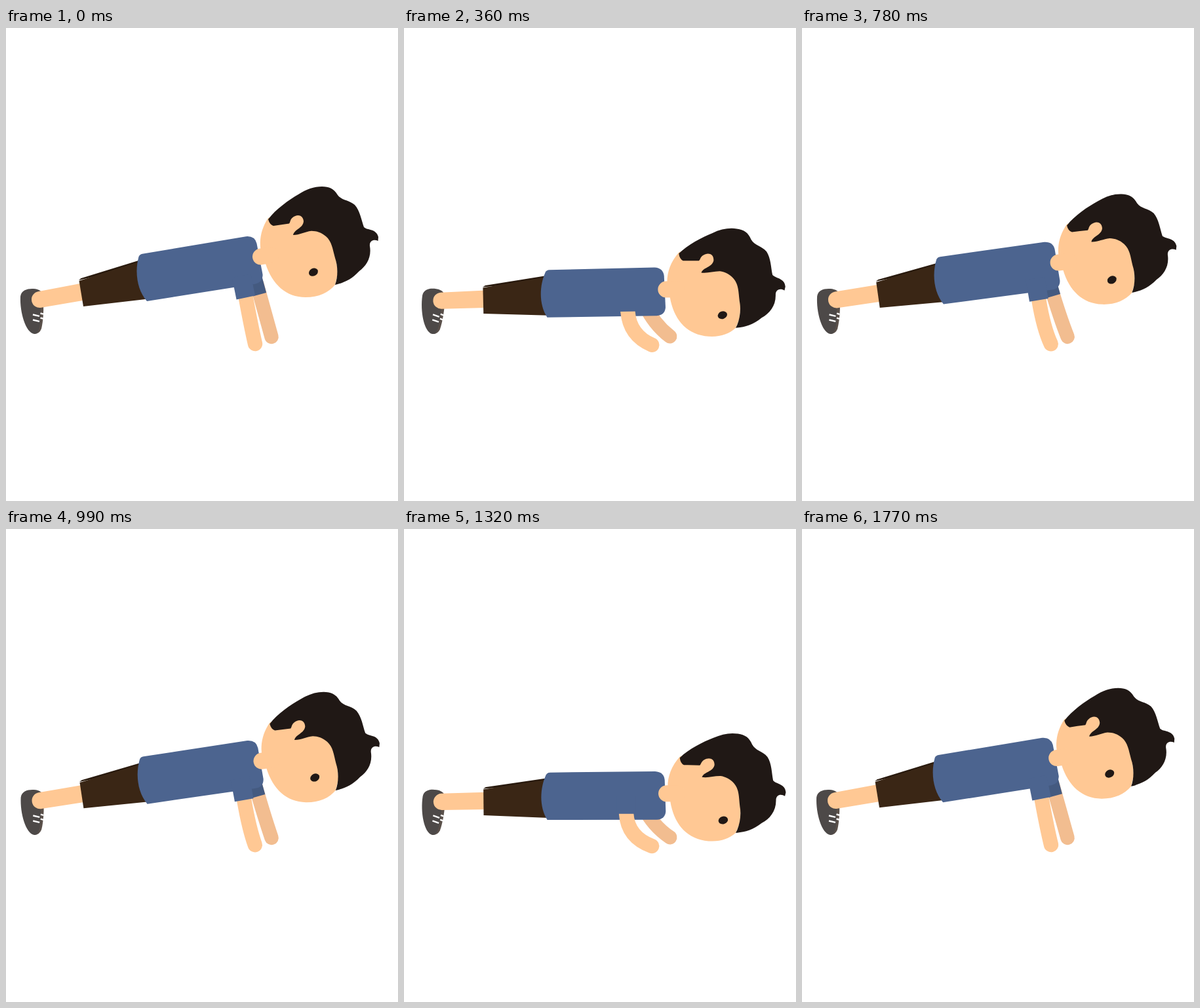
Write an HTML page that moves like this. It is 598 by 722 pixels and loops after 1.8 s.

```html
<!DOCTYPE html>
<html lang="en">
<head>
<meta charset="utf-8">
<title>Push-ups</title>
<style>
  html, body { margin: 0; width: 100%; height: 100%; overflow: hidden; background: #fff; }
  svg { display: block; width: 100%; height: 100%; }
  .skin { fill: #ffc894; }
  .shirt { fill: #4c648f; }
  .hair { fill: #201815; }
  .limb { fill: none; stroke-linecap: round; }
  .sleeve { fill: none; }
</style>
</head>
<body>
<svg viewBox="0 0 598 722">
  <g id="shoe">
    <path fill="#5a504a" d="M46 399 Q55 399 56.5 410 C58 428 57 446 54 459 Q51 467 43 467 Z"/>
    <path fill="#4d4948" d="M22 410 C23 400 33 397.500 42 398 C50 398 53 402 53 412 L52 452 C50 464 48 467 43 467 C30 465 21 434 22 410 Z"/>
    <path fill="none" stroke="#fff" stroke-width="2.400" d="M41 437.500 L51 439.800 M41 445.500 L51 447.800 M52.500 435.500 L57 436.700 M52.500 442.500 L57 443.700"/>
  </g>

  <path id="farArm" class="limb" stroke="#f2bd90" stroke-width="21.500"/>
  <path id="farSleeve" class="sleeve" stroke="#445a80" stroke-width="23"/>

  <g id="body">
    <path class="skin" d="M49 402.200 L116 389.500 L120 415.500 L54 426.800 A12.500 12.500 0 0 1 49 402.200 Z"/>
    <path fill="#291a0e" d="M111 385 L114.500 382 L202 355 L202 364 Z"/>
    <path fill="#3a2615" d="M111.500 386 L204 356.500 L217 413.500 L118 425 Z"/>
    <path class="shirt" d="M208 344.800 L366 318.200 Q379.500 317 382.500 329 L391.500 376 Q392.500 388 380 390.700 L215 417 C200 400 196 372 202.500 349 Q204 345.500 208 344.800 Z"/>
    <path class="skin" d="M400 290 L446 270 L500 320 L506 375 L502 392 C492 404 477 411 457 411 C427 411 406 391 396 360 C385 340 384 314 400 290 Z"/>
    <path class="limb" stroke="#ffc894" stroke-width="25" d="M388.500 349 L404 346.500"/>
    <path class="hair" d="M400 292 C411 277 432 262 446 254 C458 246 470 242 482 242 C493 242 500 245 506 255 C513 264 523 262 532 270 C540 279 542 293 546 304 C551 309 565 306 568 319 L567.500 325 C561 322 554 325 555 333 C558 350 550 363 539 371 C527 384 515 389 502 392 C507 379 506 362 502 351 C498 336 497 326 488 318 C481 312 474 310 466 309.800 C456 311 448 316 438 316 C440 307 453 306 454 295 C453 284 443 284 437 289.500 C433 293 434 296 432 298.500 Q420 300 408 302 Q402 300 400 292 Z"/>
    <ellipse id="eye" class="hair" rx="7.300" ry="5.800"/>
  </g>

  <path id="nearArm" class="limb" stroke="#ffc894" stroke-width="22.400"/>
  <path id="nearSleeve" class="sleeve" stroke="#4c648f" stroke-width="29"/>
</svg>
<script>
  const PERIOD = 900, STEP = 30;
  const part = id => document.getElementById(id);
  const set = (id, name, value) => part(id).setAttribute(name, value);

  // A point that drifts linearly by (dx, dy) as the body goes down.
  const at = (u, x, y, dx, dy) => [x + dx * u, y + dy * u];

  const arm = (id, start, bend, hand) => set(id, 'd', `M${start} Q${bend} ${hand}`);

  function sleeve(id, [x, y], degrees, length) {
    const a = degrees * Math.PI / 180;
    const top = [x - length * Math.sin(a), y - length * Math.cos(a)];
    set(id, 'd', `M${top} L${x},${y}`);
  }

  // u is 0 with straight arms and 1 at the lowest point.
  function pose(u) {
    set('shoe', 'transform', `rotate(${6.6 * u} 43 467)`);
    set('body', 'transform', `translate(${6.1 * u} ${1.8 * u}) rotate(${9 * u} 51 414)`);
    set('eye', 'transform', `translate(${at(u, 469, 372.7, 11.3, 3.2)}) rotate(-28)`);

    arm('farArm', at(u, 382.5, 390, -17, 35), at(u, 396.3, 440, -17, 13), at(u, 405, 471.5, 0.7, -0.8));
    sleeve('farSleeve', at(u, 386, 407, -18, 13), 15 + 8 * u, 25);

    const cuff = at(u, 365.8, 411.5, -27, 23.5);
    arm('nearArm', cuff, at(u, 374, 456, -33, 14.5), at(u, 380, 482, -1.9, 2));
    sleeve('nearSleeve', cuff, 11.5 - 11.5 * u, 34);
  }

  const begin = performance.now();
  function frame() {
    const t = Math.floor((performance.now() - begin) / STEP) * STEP;
    pose((1 - Math.cos(2 * Math.PI * t / PERIOD)) / 2);
    requestAnimationFrame(frame);
  }
  frame();
</script>
</body>
</html>
```
